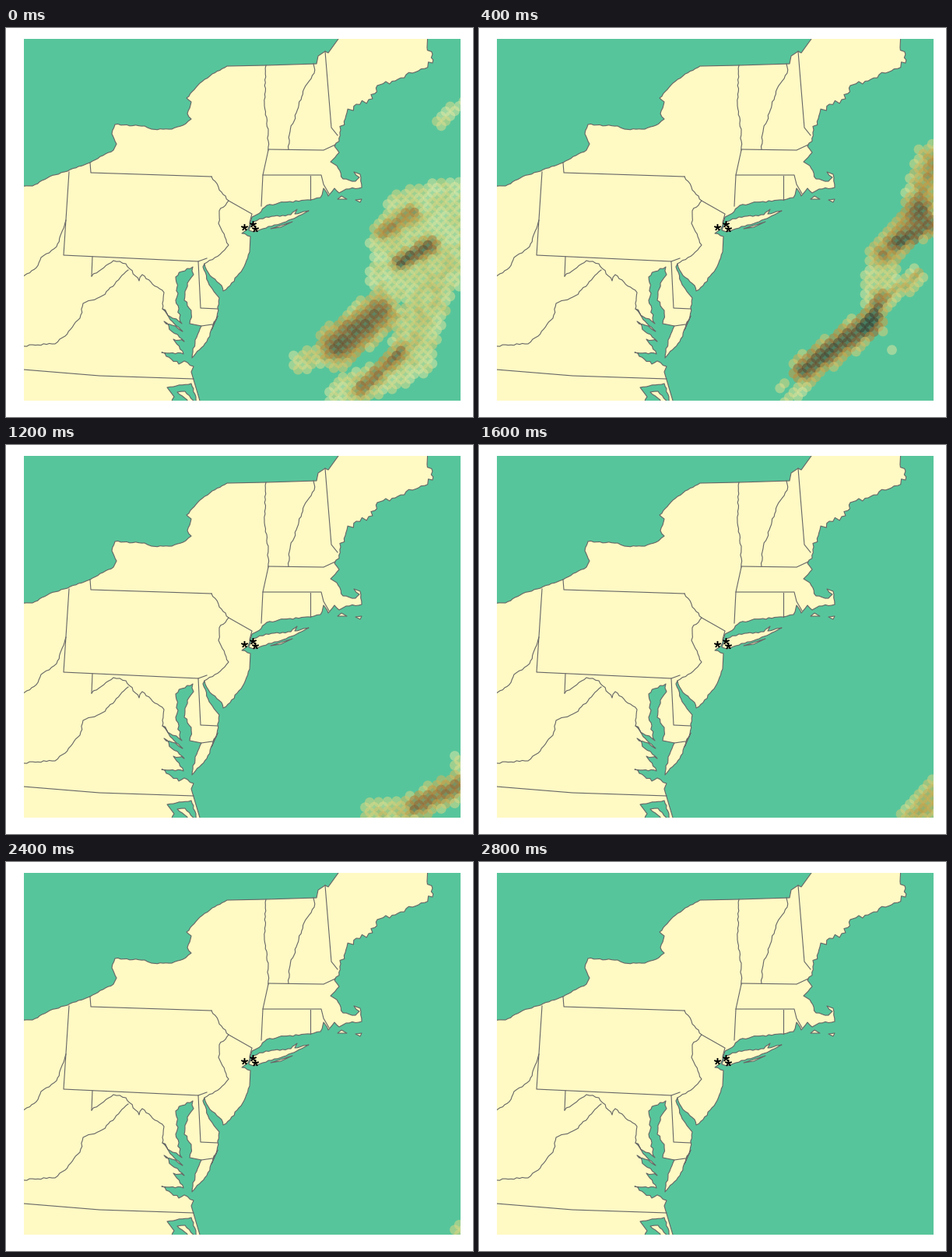
Recreate the animation shown at these times as a matplotlib script. Size 600 by 500 pixels, loop 3200 ms.

```python
import numpy as np
import matplotlib.pyplot as plt
from matplotlib.animation import FuncAnimation
from matplotlib.colors import LinearSegmentedColormap

W, H, DPI = 600, 500, 100
LEFT, TOP, RIGHT, BOTTOM = 23, 14, 584, 479
SEA, LAND, LINE = "#57c59b", "#fff9c4", "#666666"
RAIN = LinearSegmentedColormap.from_list(
    "rain", ["#e6f3b8", "#e3d67c", "#d79a3a", "#a8642c", "#6b4426", "#3a3428"])
rng = np.random.default_rng(7)

# Coast, clockwise from the western edge (stage pixels)
LAKES = [(10, 204), (34, 203), (56, 191), (79, 184), (108, 173), (138, 157),
         (142, 149), (136, 136), (140, 124), (178, 126), (187, 130),
         (213, 130), (231, 123), (238, 117), (233, 110), (238, 95), (232, 90),
         (249, 71), (265, 59), (284, 49)]
NORTH = [(334, 48), (399, 46), (401, 36), (410, 30), (414, 32), (427, 14),
         (427, 5), (542, 5)]
MAINE = [(541, 25), (548, 45), (530, 55), (514, 60), (500, 68), (477, 74),
         (466, 92), (450, 98), (438, 109), (430, 131), (424, 148)]
CAPE = [(422, 152), (428, 160), (417, 172), (425, 177), (433, 194),
        (449, 197), (454, 192), (447, 185), (455, 188), (457, 205),
        (437, 207), (428, 212), (422, 206), (414, 216), (408, 206),
        (404, 218), (391, 221), (350, 225), (335, 228), (322, 240),
        (316, 243), (311, 258), (303, 264), (314, 268)]
JERSEY = [(313, 288), (304, 310), (288, 331), (279, 338), (277, 331),
          (262, 318), (255, 303), (253, 307), (261, 330), (274, 347),
          (271, 371), (258, 403), (239, 424), (243, 401), (251, 383)]
BAY = [(236, 380), (238, 363), (229, 350), (233, 328), (241, 317), (240, 307),
       (226, 313), (218, 320), (221, 341), (218, 350), (226, 380), (214, 373),
       (201, 361), (211, 375), (227, 390), (203, 377), (213, 390), (229, 403),
       (215, 400), (228, 419), (200, 417), (222, 432), (229, 428), (241, 435)]
SOUTH = [(238, 442), (249, 479), (249, 490), (10, 490)]

LONG_ISLAND = [(312, 260), (318, 249), (334, 243), (366, 240), (374, 233),
               (371, 239), (389, 235), (360, 249), (330, 258), (318, 262)]
ISLETS = [[(426, 220), (431, 216), (438, 220)],
          [(449, 221), (457, 220), (455, 224)],
          [(340, 258), (368, 249), (353, 256)],
          [(264, 388), (272, 370), (267, 381)]]
SOUND = [(207, 462), (238, 457), (246, 484), (230, 467), (220, 468),
         (238, 484), (212, 484), (216, 474)]

# State lines that follow surveys, then those that follow rivers and ridges
STRAIGHT = [
    [(108, 173), (109, 186), (264, 191)],
    [(286, 222), (316, 239), (313, 250)],
    [(81, 185), (74, 292), (247, 300), (258, 296)],
    [(111, 294), (110, 319)],
    [(10, 438), (120, 447), (241, 451)],
    [(247, 300), (250, 360), (272, 361)],
    [(251, 383), (265, 381)],
    [(337, 157), (330, 189), (328, 229)],
    [(337, 156), (408, 157), (423, 150)],
    [(410, 30), (418, 128), (426, 138)],
    [(330, 189), (405, 189), (408, 201), (415, 213)],
    [(391, 190), (391, 221)]]
WINDING = [
    [(264, 191), (277, 211), (286, 222), (274, 235), (273, 251), (286, 279),
     (275, 291), (255, 303)],
    [(77, 247), (71, 264), (65, 281), (45, 295), (39, 308), (15, 324)],
    [(110, 319), (138, 299), (154, 303), (171, 325), (175, 317), (203, 340),
     (201, 361)],
    [(157, 311), (124, 344), (99, 354), (95, 373), (76, 396), (63, 406),
     (12, 409)],
    [(334, 48), (332, 100), (337, 130), (337, 157)],
    [(395, 46), (396, 58), (383, 78), (365, 133), (363, 156)]]
STATIONS = [(306, 256), (317, 251.5), (320.5, 258)]

# Rain bands: x0, y0, x1, y1, reach, strength
BROAD = [(480, 366, 425, 410, 28, .62), (520, 238, 575, 225, 32, 0),
         (500, 275, 570, 265, 34, 0), (495, 318, 560, 310, 32, 0),
         (555, 300, 520, 420, 30, .1), (440, 405, 380, 428, 14, .05),
         (430, 470, 505, 440, 20, 0), (506, 303, 546, 279, 13, .72),
         (486, 262, 522, 239, 16, .4), (456, 464, 506, 418, 14, .5),
         (554, 126, 584, 94, 5, 0)]
FRONT = [(584, 170, 566, 235, 24, .35), (565, 240, 522, 290, 22, .4),
         (540, 278, 584, 254, 12, .5), (520, 300, 512, 345, 22, .05),
         (505, 378, 418, 440, 19, .75), (518, 346, 498, 384, 12, .5),
         (535, 340, 565, 318, 11, .2), (384, 462, 398, 457, 5, 0),
         (394, 478, 432, 454, 6, 0), (534, 413, 534, 413, 4, 0),
         (545, 211, 545, 211, 4, 0)]
TAIL = [(395, 478, 450, 450, 15, .5), (450, 448, 510, 425, 22, .35),
        (505, 420, 586, 356, 20, .45), (500, 452, 512, 440, 14, 0),
        (576, 290, 586, 300, 13, 0), (586, 300, 586, 340, 9, 0),
        (541, 440, 580, 430, 6, 0)]
CORNER = [(475, 475, 520, 468, 18, .1), (528, 464, 582, 438, 18, .5),
          (580, 404, 584, 412, 8, 0)]
FADING = [(560, 478, 590, 445, 20, .25)]
REST = [(565, 478, 587, 445, 9, 0), (483, 477, 491, 477, 5, 0)]
LAST = [(580, 478, 586, 470, 6, 0)]
STEPS = [BROAD, FRONT, TAIL, CORNER, FADING, REST, LAST, []]


def crinkle(points, size=0.7):
    """Break long segments with small sideways kinks."""
    pts = np.array(points, float)
    out = [pts[:1]]
    for a, b in zip(pts, pts[1:]):
        d = b - a
        length = np.hypot(*d)
        n = max(int(length // 3.5), 1)
        t = np.arange(1, n + 1)[:, None] / n
        kink = np.clip(rng.normal(0, size, (n, 1)), -1.6 * size, 1.6 * size)
        kink[-1] = 0
        out.append(a + d * t + kink * np.array([-d[1], d[0]]) / length)
    return np.vstack(out)


def rain_grid():
    """Staggered dot centres, rows rising slightly to the right."""
    row, col = np.divmod(np.arange(80 * 22), 22)
    dx = col * 11.5 + row % 2 * 5.75
    return np.column_stack([358 + dx, 80 + row * 6.1 - dx * 0.045])


def build(bands, grid, noise):
    wet = np.zeros(len(grid), bool)
    value = 0.13 + noise
    for x0, y0, x1, y1, reach, amp in bands:
        a, d = np.array([x0, y0]), np.array([x1 - x0, y1 - y0])
        t = np.clip((grid - a) @ d / max(d @ d, 1), 0, 1)
        dist = np.hypot(*(grid - a - t[:, None] * d).T)
        wet |= dist < reach
        value = value + amp * np.exp(-2 * (dist / reach) ** 2)
    return grid[wet], np.clip(value[wet], 0, 1)


fig = plt.figure(figsize=(W / DPI, H / DPI), dpi=DPI, facecolor="white")
ax = fig.add_axes([LEFT / W, 1 - BOTTOM / H,
                   (RIGHT - LEFT) / W, (BOTTOM - TOP) / H])
ax.set(xlim=(LEFT, RIGHT), ylim=(BOTTOM, TOP), xticks=[], yticks=[])
ax.set_facecolor(SEA)
for spine in ax.spines.values():
    spine.set_visible(False)


def fill(points, color=LAND):
    ax.fill(*np.array(points).T, fc=color, ec=LINE, lw=0.8, joinstyle="round")


fill(np.vstack([crinkle(LAKES, 0.5), NORTH, crinkle(MAINE, 2.3),
                crinkle(CAPE, 0.6), crinkle(JERSEY, 0.6), crinkle(BAY, 1),
                SOUTH]))
fill(crinkle(LONG_ISLAND, 0.5))
for islet in ISLETS:
    fill(islet)
fill(crinkle(SOUND, 0.6), SEA)
for border in STRAIGHT + [crinkle(b) for b in WINDING]:
    ax.plot(*np.array(border).T, color=LINE, lw=0.8)
ax.plot(*np.array(STATIONS).T, ls="", marker=(5, 2, 0), ms=6, mew=1.1,
        color="black", zorder=4)

grid = rain_grid()
noise = rng.uniform(-0.08, 0.08, len(grid))
scenes = [build(bands, grid, noise) for bands in STEPS]
rain = ax.scatter([], [], s=85, lw=0, alpha=0.5, cmap=RAIN, vmin=0, vmax=1,
                  c=[], zorder=3)


def update(i):
    pts, value = scenes[i]
    rain.set_offsets(pts)
    rain.set_array(value)
    return (rain,)


anim = FuncAnimation(fig, update, frames=len(scenes), interval=400,
                     init_func=lambda: update(0), repeat=True, repeat_delay=0)
plt.show()
```
